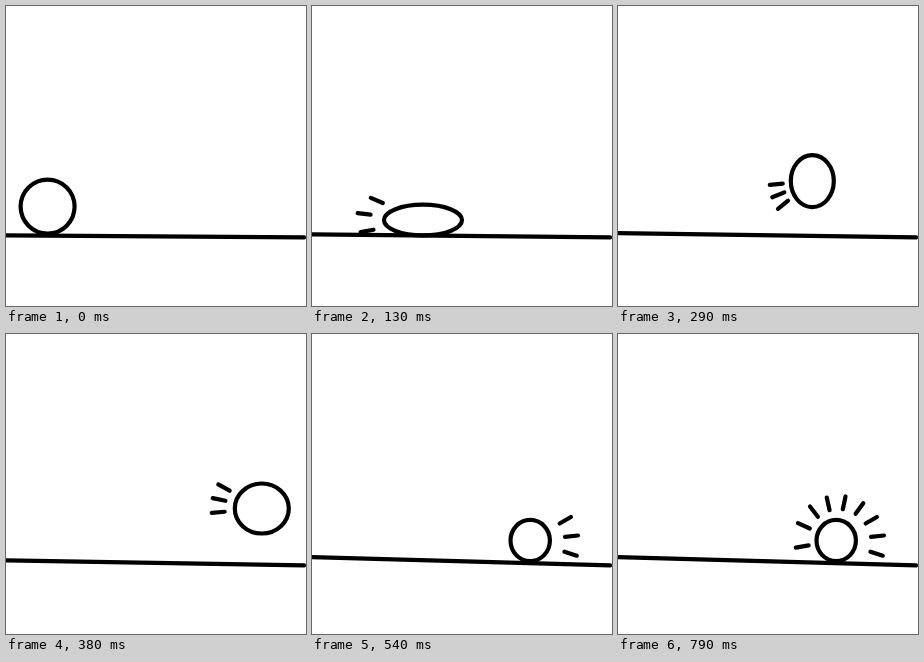
Write an HTML page with a canvas that moves like this. It is 300 px wide and 300 px high and loops after 4210 ms.

```html
<!DOCTYPE html>
<html lang="en">
<head>
<meta charset="utf-8">
<title>Bouncing ball sunrise</title>
<style>
html, body { margin: 0; width: 100%; height: 100%; overflow: hidden; background: #fff; }
canvas { display: block; width: 300px; height: 300px; }
</style>
</head>
<body>
<canvas id="stage"></canvas>
<script>
const LOOP = 4210, LAST = 19, LANDED = 13, PEAK = 8.15;

// Key poses; back is the direction of the speed lines in degrees.
const poses = [
  { at: 0, x: 41.6, rx: 27, ry: 27, back: 186 },
  { at: 3, x: 111, rx: 39, ry: 15.4, back: 186 },
  { at: 7, x: 194.3, rx: 21.5, ry: 26, back: 158 },
  { at: 9, x: 255.8, rx: 27, ry: 25, back: 192 },
  { at: 11, x: 270, rx: 29.4, ry: 21, back: 275 },
  { at: LANDED, x: 218.2, rx: 19.7, ry: 20.6, back: 275 }
];

const canvas = document.getElementById("stage");
const ctx = canvas.getContext("2d");
const ratio = window.devicePixelRatio || 1;
canvas.width = canvas.height = 300 * ratio;
ctx.scale(ratio, ratio);
ctx.lineCap = "round";
ctx.lineWidth = 4.2;
ctx.strokeStyle = "#000";

const mix = (a, b, p) => a + (b - a) * p;

function poseAt(step) {
  const s = Math.min(step, LANDED);
  const next = Math.max(1, poses.findIndex(p => p.at >= s));
  const a = poses[next - 1], b = poses[next];
  const p = (s - a.at) / (b.at - a.at);
  const pose = {};
  for (const key in a) pose[key] = mix(a[key], b[key], p);
  return pose;
}

function line(x1, y1, x2, y2) {
  ctx.beginPath();
  ctx.moveTo(x1, y1);
  ctx.lineTo(x2, y2);
  ctx.stroke();
}

// A dash pointing away from a centre.
function spoke(x, y, degrees, from, length) {
  const a = degrees * Math.PI / 180, c = Math.cos(a), s = Math.sin(a);
  const to = from + length;
  line(x + c * from, y + s * from, x + c * to, y + s * to);
}

// Distance from the ball's centre to its outline.
function edge({ rx, ry }, degrees) {
  const a = degrees * Math.PI / 180;
  return rx * ry / Math.hypot(ry * Math.cos(a), rx * Math.sin(a));
}

function drawTrail(ball, y) {
  for (let i = -1; i <= 1; i++) {
    const angle = ball.back + i * 17;
    spoke(ball.x, y, angle, edge(ball, angle) + ball.rx * 0.38, 13);
  }
}

// Rays open anticlockwise; the last ones droop towards the ground.
function drawRays(x, y, count) {
  for (let i = 0; i < count; i++) {
    spoke(x, y, 18 - 24 * i - 16 * (i / 8) ** 8, 36 - i, 13);
  }
}

function draw(step) {
  ctx.fillStyle = "#fff";
  ctx.fillRect(0, 0, 300, 300);

  const left = step < LANDED ? 229.3 - 0.32 * step : 223;
  const right = 231.4;
  line(-1, left, 298, right);

  const ball = poseAt(step);
  const lift = Math.max(0, 32 - 3.94 * (step - PEAK) ** 2);
  const sink = 0.85 * (ball.rx / ball.ry - 1) ** 2;
  const y = mix(left, right, ball.x / 300) - 2 - lift + sink - ball.ry;
  ctx.beginPath();
  ctx.ellipse(ball.x, y, ball.rx, ball.ry, 0, 0, Math.PI * 2);
  ctx.stroke();

  if (step >= 2 && step <= 11) drawTrail(ball, y);
  if (step >= LANDED) drawRays(ball.x, y, step - LANDED + 3);
}

// Drawings change 24 times a second, on whole hundredths.
const startOf = n => Math.round(n * 12.5 / 3) * 10;

function stepAt(t) {
  let n = LAST;
  while (n > 0 && startOf(n) > t) n--;
  return n;
}

const begin = performance.now();
function tick() {
  draw(stepAt((performance.now() - begin) % LOOP));
  requestAnimationFrame(tick);
}
tick();
</script>
</body>
</html>
```
